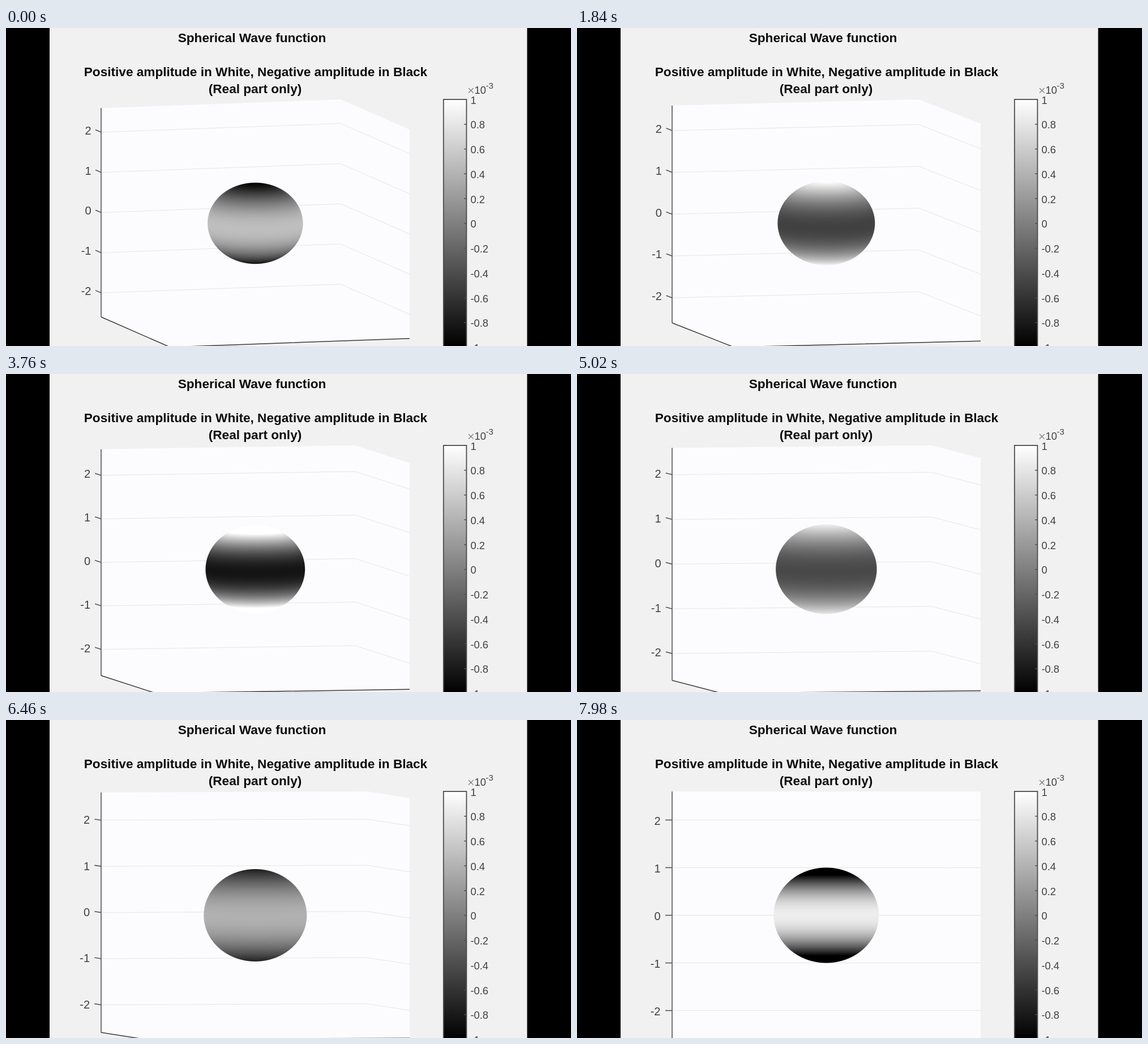
Recreate the animation shown at these times as an HTML page with a canvas. Size 998x561 px, loop 8000 ms.

```html
<!DOCTYPE html>
<html lang="en">
<head>
<meta charset="utf-8">
<title>Spherical Wave function</title>
<style>
  html, body { margin: 0; width: 100%; height: 100%; overflow: hidden; background: #000; }
  svg, canvas { position: absolute; left: 0; top: 0; display: block; }
  canvas { left: 340px; top: 244px; }
  text { font-family: "Liberation Sans", Arial, sans-serif; fill: #404040; }
  .title { font-size: 22.6px; font-weight: bold; text-anchor: middle; fill: #0c0c0c; }
  .bar { font-size: 18.3px; }
  .tick { font-size: 20px; text-anchor: end; }
  .grid { fill: none; stroke: #e5e5e2; }
  .axis { fill: none; stroke: #55555a; stroke-width: 1.6; }
  .base { fill: none; stroke: #3c3c3c; stroke-width: 1.5; }
</style>
</head>
<body>
<svg id="stage" width="998" height="561" viewBox="0 0 998 561">
  <defs>
    <linearGradient id="gray" x1="0" y1="0" x2="0" y2="1">
      <stop offset="0" stop-color="#fff"/>
      <stop offset="1" stop-color="#000"/>
    </linearGradient>
  </defs>
  <rect width="998" height="561" fill="#000"/>
  <rect x="77" width="843.5" height="561" fill="#f1f1f2"/>
  <text class="title" x="434.5" y="24.7">Spherical Wave function</text>
  <text class="title" x="441" y="84.7">Positive amplitude in White, Negative amplitude in Black</text>
  <text class="title" x="440" y="114.7">(Real part only)</text>
</svg>
<canvas id="ball" width="200" height="200"></canvas>
<script>
const LOOP = 8000, LAST = 171;
const LEFT = 168, RIGHT = 713, TOP = 126, HEIGHT = 437;
const CX = 440.3, CY = 344.5, LIMIT = 2.6;
const stage = document.getElementById('stage');
const ball = document.getElementById('ball');
const ctx = ball.getContext('2d');
const img = ctx.createImageData(200, 200);

function add(tag, attrs, text) {
  const el = document.createElementNS('http://www.w3.org/2000/svg', tag);
  for (const k in attrs) el.setAttribute(k, attrs[k]);
  if (text !== undefined) el.textContent = text;
  return stage.appendChild(el);
}

function drawColorbar() {
  add('rect', { x: 772.8, y: 126, width: 40.6, height: HEIGHT, fill: 'url(#gray)', stroke: '#4c4c48', 'stroke-width': 1.8 });
  for (let i = 0; i <= 10; i++) {
    const y = 126.5 + i * 43.75;
    if (i) add('path', { d: `M809 ${y - 0.5}h4`, stroke: '#4c4c48', 'stroke-width': 1.4 });
    add('text', { class: 'bar', x: 820.5, y: y + 7 }, String((5 - i) / 5));
  }
  add('path', { d: 'M817 106l8.5 8.5m0 -8.5l-8.5 8.5', stroke: '#777', 'stroke-width': 1.1 });
  add('text', { class: 'bar', x: 827.5, y: 116.3 }, '10');
  add('text', { x: 847.5, y: 107, 'font-size': 15 }, '-3');
}

drawColorbar();
const walls = add('path', { fill: '#fcfcfe' });
const rows = [2, 1, 0, -1, -2].map(z => ({
  z,
  grid: add('path', { class: 'grid' }),
  tick: add('path', { class: 'axis' }),
  label: add('text', { class: 'tick' }, z)
}));
const base = add('path', { class: 'base' });
const axis = add('path', { class: 'axis' });

// Shades the zonal harmonic 1 - 3z² on the visible half of the sphere.
function drawBall(rx, ry, el, amp) {
  const d = img.data, ce = Math.cos(el), se = Math.sin(el);
  const ox = CX - 340, oy = CY - 244;
  for (let y = 0, p = 0; y < 200; y++) {
    const v = (oy - y - 0.5) / ry;
    for (let x = 0; x < 200; x++, p += 4) {
      const u = (x + 0.5 - ox) / rx, r2 = u * u + v * v;
      const edge = (1 - Math.sqrt(r2)) * ry + 0.5;
      const z = v * ce + Math.sqrt(Math.max(0, 1 - r2)) * se;
      const value = amp * (1 - 3 * z * z);
      d[p] = d[p + 1] = d[p + 2] = 127.5 * (1 + value);
      d[p + 3] = 255 * Math.min(1, Math.max(0, edge));
    }
  }
  ctx.putImageData(img, 0, 0);
}

// Steps last 20, 100 and 20 ms in turn.
function stepAt(t) {
  const r = t % 140;
  return 3 * Math.floor(t / 140) + (r < 20 ? 0 : r < 120 ? 1 : 2);
}

function draw(n) {
  const deg = Math.PI / 180;
  const el = (LAST - n) * 0.05 * deg, az = el + 7.5 * deg;
  const c = Math.cos(az), s = Math.sin(az);
  const kx = (RIGHT - LEFT) / (c + s);
  const ky = HEIGHT / (Math.cos(el) + Math.sin(el) * (c + s));
  const back = LEFT + kx * c, front = LEFT + kx * s;
  const dl = ky * Math.sin(el) * s, dr = ky * Math.sin(el) * c;
  const h = ky * Math.cos(el);
  const l0 = TOP + dl, l1 = l0 + h, r0 = TOP + dr, r1 = r0 + h;

  walls.setAttribute('d', `M${LEFT} ${l0}L${back} ${TOP}L${RIGHT} ${r0}V${r1}L${front} ${l1 + dr}L${LEFT} ${l1}Z`);
  axis.setAttribute('d', `M${LEFT} ${l0}V${l1}`);
  base.setAttribute('d', `M${LEFT} ${l1}L${front} ${l1 + dr}L${RIGHT} ${r1}`);

  const len = 10 + 2 * n / LAST, rise = len * dr / (front - LEFT);
  for (const { z, grid, tick, label } of rows) {
    const y = TOP + h / 2 - z * h / (2 * LIMIT);
    grid.setAttribute('d', `M${LEFT} ${y + dl}L${back} ${y}L${RIGHT} ${y + dr}`);
    tick.setAttribute('d', `M${LEFT} ${y + dl}l${-len} ${-rise}`);
    label.setAttribute('x', 150.5 - 3 * n / LAST);
    label.setAttribute('y', y + dl - rise + 8.2);
  }

  const amp = -0.87 * Math.cos((n - 72) / 208 * 2 * Math.PI);
  drawBall(kx / 5.23, ky / (2 * LIMIT), el, amp);
}

const start = performance.now();
let shown = -1;
function frame() {
  const n = stepAt((performance.now() - start) % LOOP);
  if (n !== shown) draw(shown = n);
  requestAnimationFrame(frame);
}
frame();
</script>
</body>
</html>
```
